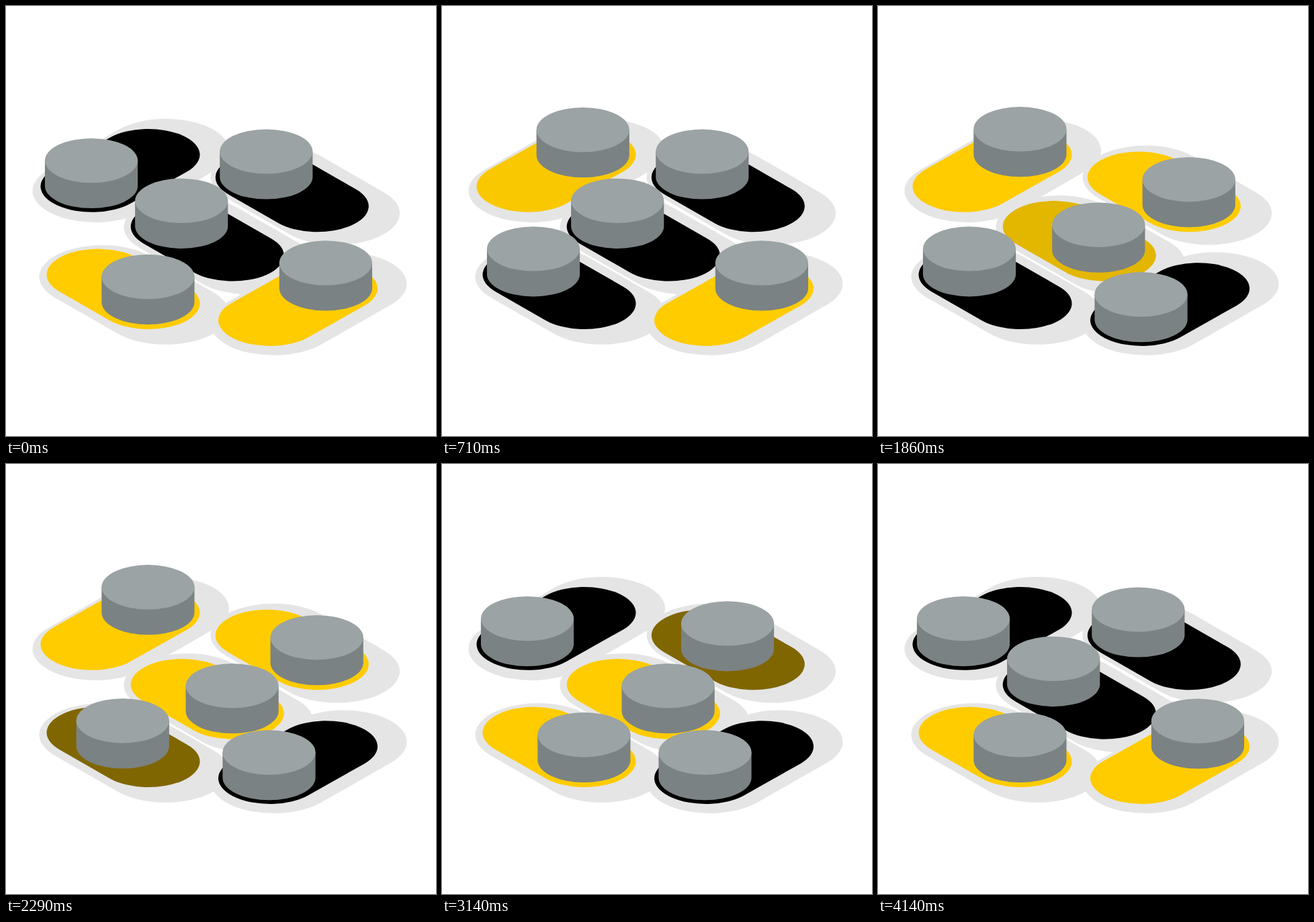
Write an HTML page without scripts that moves like this. It is 640 px wide and 640 px high and loops after 4780 ms.

```html
<!DOCTYPE html>
<html lang="en">
<head>
<meta charset="utf-8">
<title>Toggle switches</title>
<style>
  @property --on { syntax: "<number>"; inherits: true; initial-value: 0; }

  html, body { margin: 0; width: 100%; height: 100%; overflow: hidden; background: #fff; }
  svg { display: block; width: 100%; height: 100%; }

  .base, .slot { fill: none; stroke-linecap: round; }
  .base { stroke: #e5e5e5; stroke-width: 188; }
  .slot {
    stroke: rgb(calc(255 * var(--on)) calc(204 * var(--on)) 0);
    stroke-width: 153;
  }
  .cap { transform: translate(calc(var(--dx) * var(--on)), calc(var(--dy) * var(--on))); }

  .down { --dx: 75.4px; --dy: 41.6px; }
  .up { --dx: 84.4px; --dy: -46.8px; }

  /* one slide: snappy ease with a soft tail, posed 14 times a second */
  .switch {
    animation: 4.78s infinite;
    animation-timing-function: linear(.11 0% 20%, .5 20% 40%, .89 40% 60%, .98 60% 80%, .995 80% 100%, 1);
  }
  #a { animation-name: a; }
  #b { animation-name: b; }
  #c { animation-name: c; --dy: 40.2px; }
  #d { animation-name: d; }
  #e { animation-name: e; }

  @keyframes a {
    0%, 10.36%, 64.15%, 100% { --on: 0; }
    17.83%, 56.68% { --on: 1; }
  }
  @keyframes b {
    0%, 17.83%, 71.62%, 100% { --on: 0; }
    25.3%, 64.15% { --on: 1; }
  }
  @keyframes c {
    0%, 35.76%, 86.57%, 100% { --on: 0; }
    43.23% { --on: 1; }
    82.08% {
      --on: 1;
      animation-timing-function: linear(.11 0% 33.3%, .5 33.3% 66.6%, .89 66.6% 100%, 1);
    }
  }
  @keyframes d {
    0%, 1.39%, 53.69%, 100% { --on: 1; }
    8.86%, 46.22% { --on: 0; }
  }
  @keyframes e {
    0%, 26.79%, 79.09%, 100% { --on: 1; }
    34.26%, 71.62% { --on: 0; }
  }
</style>
</head>
<body>
<svg viewBox="0 0 640 640">
  <defs>
    <g id="knob" transform="translate(-1 -38.4)">
      <path fill="#7b8283" d="M-69.1 0v37.8a69.1 33.2 0 0 0 138.2 0V0z"/>
      <ellipse fill="#9ba3a4" rx="69.1" ry="33.2"/>
    </g>
    <path id="fall" transform="scale(1 .5)" d="M0 0l75 86"/>
    <path id="rise" transform="scale(1 .5)" d="M0 0l84 -94.4"/>
  </defs>

  <path class="base" transform="scale(1 .5)"
    d="M133.5 550l104.5 -120M398.5 509.4l93.5 107.6M269.5 658l93.5 107M143.5 806l94 107.6M398.5 945.6l104 -118.6"/>

  <g transform="translate(128 268.5)">
    <g id="a" class="switch up"><use class="slot" href="#rise"/><g class="cap"><use href="#knob"/></g></g>
  </g>
  <g transform="translate(388.3 255)">
    <g id="b" class="switch down"><use class="slot" href="#fall"/><g class="cap"><use href="#knob"/></g></g>
  </g>
  <g transform="translate(262.2 328.3)">
    <g id="c" class="switch down"><use class="slot" href="#fall"/><g class="cap"><use href="#knob"/></g></g>
  </g>
  <g transform="translate(137 399.8)">
    <g id="d" class="switch down"><use class="slot" href="#fall"/><g class="cap"><use href="#knob"/></g></g>
  </g>
  <g transform="translate(392.5 467.7)">
    <g id="e" class="switch up"><use class="slot" href="#rise"/><g class="cap"><use href="#knob"/></g></g>
  </g>
</svg>
</body>
</html>
```
